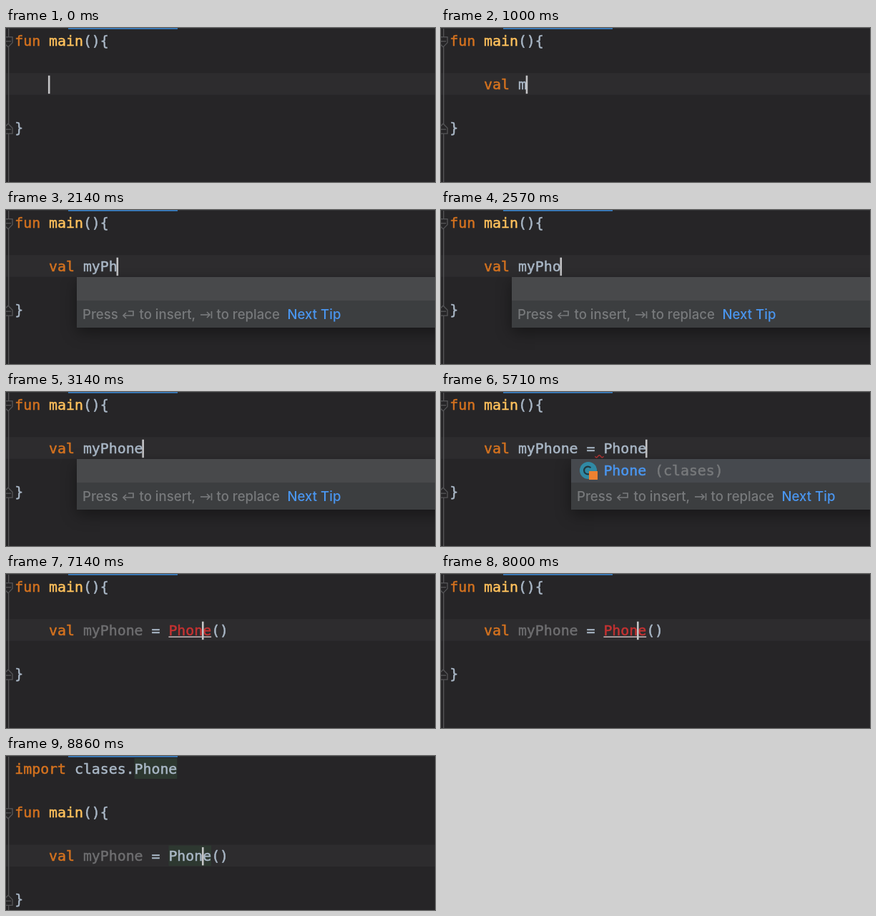
These frames come from a looping animation (600 by 216 pixels, 9010 ms). An HTML page with a canvas:

```html
<!DOCTYPE html>
<html lang="en">
<head>
<meta charset="utf-8">
<title>Code completion</title>
<style>
html, body { margin: 0; width: 600px; height: 216px; overflow: hidden; background: #262527; }
canvas { display: block; }
</style>
</head>
<body>
<canvas id="stage" width="600" height="216"></canvas>
<script>
const ctx = document.getElementById('stage').getContext('2d');
const LOOP = 9010, CELL = 11.95, LEFT = 12.3, LINE = 30.6;
const MONO = '19.85px "DejaVu Sans Mono", "Liberation Mono", monospace';
const SANS = '500 18.6px Inter, Roboto, sans-serif';
const C = {
  bg: '#262527', row: '#2d2c2e', text: '#a9b7c6', key: '#d4721f', fn: '#ffc15c',
  dim: '#6e6e70', error: '#c53232', used: '#2d3830', gutter: '#565658',
  link: '#4a96f0', hint: '#77797b'
};

// [time, text after the indent]
const typing = [
  [0, ''], [290, 'v'], [430, 'va'], [570, 'val'], [710, 'val '],
  [1000, 'val m'], [1290, 'val my'], [1570, 'val myP'], [2000, 'val myPh'],
  [2290, 'val myPho'], [2860, 'val myPhon'], [3140, 'val myPhone'],
  [3430, 'val myPhone '], [3570, 'val myPhone ='], [3710, 'val myPhone = '],
  [4430, 'val myPhone = P'], [4860, 'val myPhone = Ph'], [5140, 'val myPhone = Pho'],
  [5430, 'val myPhone = Phon'], [5570, 'val myPhone = Phone'],
  [6140, 'val myPhone = Phone('], [6290, 'val myPhone = Phone()']
];
const caretMoves = [[6290, 24], [6860, 23], [7000, 22]];

const within = (t, a, b) => t >= a && t < b;
const colX = col => LEFT + col * CELL;
const baseY = line => 24.6 + line * LINE;
const lineTop = line => 2 + line * LINE;

function latest(list, t) {
  let value;
  for (const [at, v] of list) if (t >= at) value = v;
  return value;
}

function rect(x, y, w, h, color) {
  ctx.fillStyle = color;
  ctx.fillRect(x, y, w, h);
}

function write(text, x, y, color, font = MONO) {
  ctx.font = font;
  ctx.fillStyle = color;
  ctx.fillText(text, x, y);
}

// Editor text gets a thin outline for a slightly heavier weight
function writeMono(text, x, y, color) {
  write(text, x, y, color);
  ctx.strokeStyle = color;
  ctx.lineWidth = .5;
  ctx.strokeText(text, x, y);
}

function code(text, col, line, color) {
  writeMono(text, colX(col), baseY(line), color);
}

function stroke(points, color, width = 1.5, close = false) {
  ctx.beginPath();
  for (const [x, y] of points) ctx.lineTo(x, y);
  if (close) ctx.closePath();
  ctx.strokeStyle = color;
  ctx.lineWidth = width;
  ctx.stroke();
}

function fold(y, dir) {
  const shape = [[-3, -7], [9, -7], [9, 1], [3, 7], [-3, 1]].map(([x, dy]) => [x, y + dy * dir]);
  ctx.beginPath();
  for (const p of shape) ctx.lineTo(...p);
  ctx.fillStyle = C.bg;
  ctx.fill();
  stroke(shape, C.gutter, 1.3, true);
  stroke([[0, y - dir], [7, y - dir]], C.gutter, 1.3);
}

function squiggle(x, y, width) {
  const points = [];
  for (let i = 0; i <= width; i++) points.push([x + i, y + 1.6 * Math.sin(i * Math.PI * 2 / 8)]);
  stroke(points, '#b83434', 1.4);
}

function popup(x, rowColor) {
  ctx.save();
  ctx.shadowColor = 'rgba(0, 0, 0, .4)';
  ctx.shadowBlur = 20;
  ctx.shadowOffsetY = 7;
  rect(x, 94, 640 - x, 71, '#3c3e40');
  ctx.restore();
  rect(x, 94, 600 - x, 33, rowColor);
  const put = (text, dx, color) => write(text, x + dx, 153, color, SANS);
  put('Press', 8, C.hint);
  put('to insert,', 87.5, C.hint);
  put('to replace', 195.5, C.hint);
  put('Next Tip', 294.5, C.link);
  // return and tab keys
  const at = (dx, points) => stroke(points.map(([a, b]) => [x + dx + a, 147 + b]), C.hint, 1.7);
  at(64, [[8, -5], [15, -5], [15, 1], [1, 1]]);
  at(64, [[5, -3], [1, 1], [5, 5]]);
  at(173, [[0, 0], [13, 0]]);
  at(173, [[9, -4], [13, 0], [9, 4]]);
  at(173, [[15.5, -5], [15.5, 5]]);
}

function classPopup(prefix) {
  const name = 'Phone', x = colX(18), y = 116.6;
  popup(182, '#46494e');
  ctx.beginPath();
  ctx.arc(206, 110, 12, 0, Math.PI * 2);
  ctx.fillStyle = '#3089a4';
  ctx.fill();
  ctx.beginPath();
  ctx.arc(205.5, 110, 5.4, .75, Math.PI * 2 - .75);
  ctx.strokeStyle = '#24363c';
  ctx.lineWidth = 2.2;
  ctx.stroke();
  rect(207, 111, 12, 12, '#ee8130');
  writeMono(name.slice(0, prefix), x, y, C.link);
  writeMono(name.slice(prefix), x + prefix * CELL, y, C.text);
  writeMono('(clases)', x + 6 * CELL, y, C.hint);
}

function statement(text, line, t) {
  const analysed = t >= 6710, imported = t >= 8290;
  const name = text.slice(4, 11), type = text.slice(14, 19);
  const found = imported && t >= 8570;
  if (found) rect(colX(18), lineTop(line) + 1, 5 * CELL, 29, C.used);
  code(text.slice(0, 3), 4, line, text.length < 3 ? C.text : C.key);
  code(name, 8, line, analysed ? C.dim : C.text);
  code(text.slice(12, 13), 16, line, C.text);
  code(type, 18, line, analysed && !imported ? C.error : C.text);
  code(text.slice(19), 23, line, C.text);
  if (analysed && !imported) rect(colX(18), 87.5, 5 * CELL, 1.5, '#c9b9bb');
  if (within(t, 4000, 6290)) squiggle(colX(17), 90.3, 12);
}

function draw(t) {
  const imported = t >= 8290;
  const shift = imported ? 2 : 0, dy = shift * LINE;
  const text = latest(typing, t);
  const caret = latest(caretMoves, t) ?? 4 + text.length;

  rect(0, 0, 600, 216, C.bg);
  rect(0, 0, 600, 1, '#303032');
  rect(87, 0, 153, 1.6, '#3a84cc');
  rect(0, lineTop(2 + shift), 600, LINE, C.row);
  rect(3, 1, 1.3, 215, C.gutter);
  fold(19.6 + dy, 1);
  fold(141.2 + dy, -1);

  if (imported) {
    if (t >= 8570) rect(colX(14), 3, 5 * CELL, 29, C.used);
    code('import', 0, 0, C.key);
    code('clases.Phone', 7, 0, C.text);
  }
  code('fun', 0, shift, C.key);
  code('main', 4, shift, C.fn);
  code('(){', 8, shift, C.text);
  statement(text, 2 + shift, t);
  code('}', 0, 4 + shift, C.text);
  rect(colX(caret) - 1.2, lineTop(2 + shift) + 3.5, 2.6, 25.5, '#c4c4c6');

  if (within(t, 1290, 3430)) popup(99, '#48494b');
  if (within(t, 4570, 6000)) classPopup(text.length - 14);
}

function tick() {
  draw(performance.now() % LOOP);
  requestAnimationFrame(tick);
}
tick();
</script>
</body>
</html>
```
